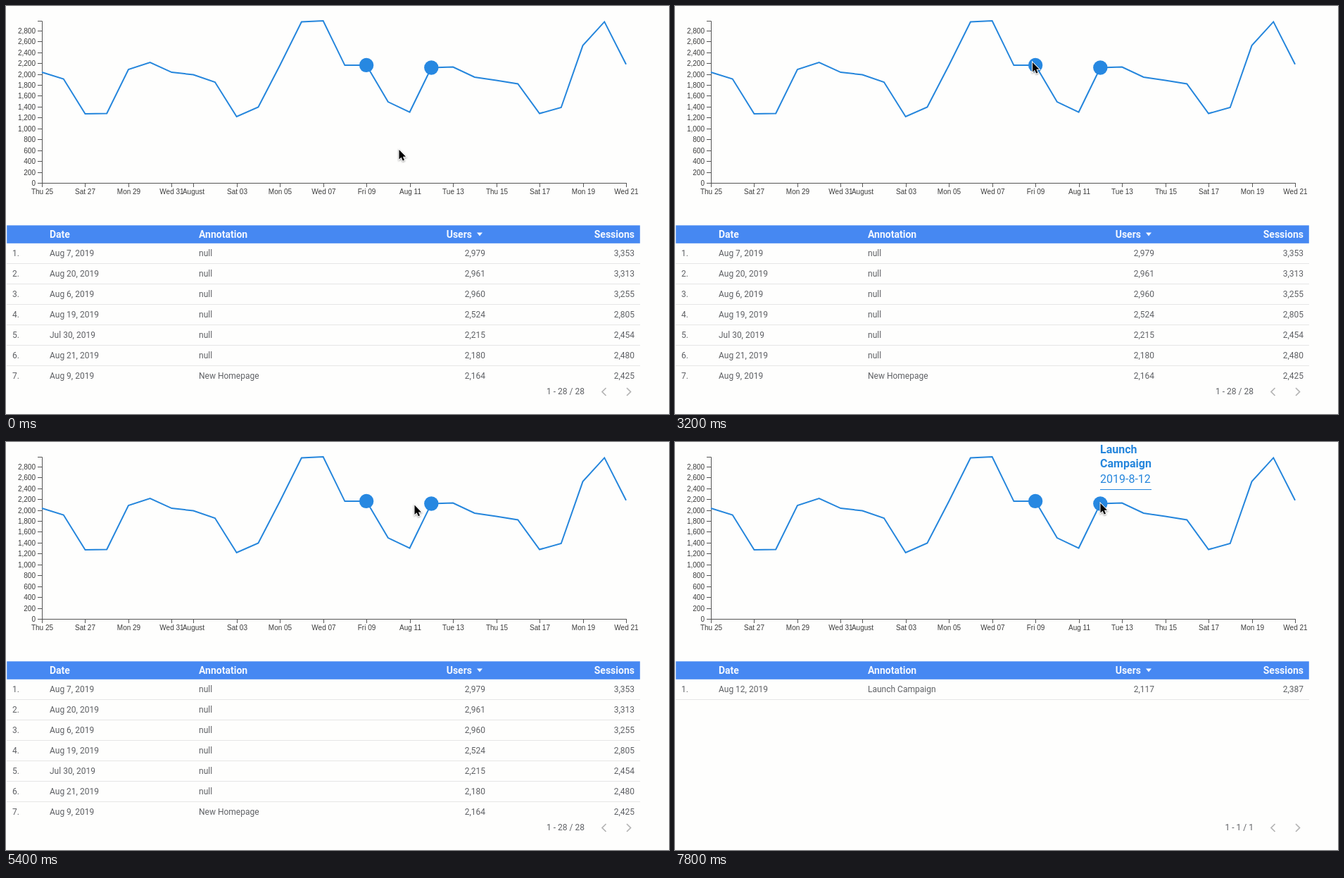
An HTML page that plays this animation: 942x579 px, repeating every 8 s.

```html
<!DOCTYPE html>
<html lang="en">
<head>
<meta charset="utf-8">
<title>Annotated chart</title>
<style>
html, body { margin: 0; width: 100%; height: 100%; overflow: hidden; background: #fefefd; }
svg { display: block; width: 942px; height: 579px; }
text { font: 12px Roboto, sans-serif; fill: #5f6165; }
.axis text { font: 10px "Liberation Sans", Helvetica, Arial, sans-serif; fill: #3c3c3c; }
.axis path { fill: none; stroke: #555; }
.head text { font-weight: 700; font-size: 14px; fill: #f4f8ff; }
.tip text { font-size: 16px; fill: #2586dc; }
.tip .bold { font-weight: 700; }
.rule { stroke: #e6e6e6; }
.end { text-anchor: end; }
.mid { text-anchor: middle; }
</style>
</head>
<body>
<svg viewBox="0 0 942 579">
  <g id="axes" class="axis"></g>
  <g id="plot" fill="#2788e1"></g>
  <g id="tip" class="tip">
    <text class="bold" x="604" y="16">Launch</text>
    <text class="bold" x="604" y="36">Campaign</text>
    <text x="604" y="58">2019-8-12</text>
    <path d="M604 67.5H677" stroke="#2586dc"/>
  </g>
  <g class="head">
    <rect x="1.2" y="311.3" width="899.6" height="25.5" fill="#4688f2"/>
    <text x="62" y="329">Date</text>
    <text x="274" y="329">Annotation</text>
    <text class="end" x="662" y="329">Users</text>
    <text class="end" x="893" y="329">Sessions</text>
    <path d="M669 321.5H677L673 326.5Z" fill="#f4f8ff"/>
  </g>
  <g id="allRows"></g>
  <g id="oneRow"></g>
  <path d="M852.5 542L847 547.5L852.5 553M882 542L887.5 547.5L882 553" fill="none" stroke="#b4b4b4" stroke-width="1.7"/>
  <g id="cursor" style="filter:drop-shadow(0 1px 1px rgba(0,0,0,.4))">
    <path transform="scale(.95)" d="M0 0V14.2L3.3 11.2L5.5 16.4L7.9 15.4L5.7 10.3H10Z" stroke="#fff" stroke-width="2" paint-order="stroke"/>
  </g>
</svg>
<script>
const el = id => document.getElementById(id);
const label = (x, y, s, cls = '') => `<text x="${x}" y="${y}" class="${cls}">${s}</text>`;
const comma = n => n.toLocaleString('en-US');

// Daily users from Jul 25, 2019
const users = [2033, 1910, 1269, 1275, 2085, 2215, 2033, 1988, 1852, 1218, 1392, 2160, 2960, 2979,
  2162, 2164, 1489, 1301, 2117, 2131, 1943, 1884, 1820, 1275, 1386, 2524, 2961, 2180];
const notes = { 15: 'New Homepage', 18: 'Launch Campaign' };
const marked = Object.keys(notes).map(Number);
const launch = marked[1];
const lastDay = users.length - 1;
const dateOf = day => new Date(Date.UTC(2019, 6, 25 + day));
const format = (day, options) => dateOf(day).toLocaleDateString('en-US', { timeZone: 'UTC', ...options });

// Chart
const px = day => 51 + day * 830 / lastDay;
const py = value => 251 - value * 230 / Math.max(...users);

function dayName(day) {
  const date = dateOf(day).getUTCDate();
  if (date === 1) return format(day, { month: 'long' });
  const prefix = format(day, dateOf(day).getUTCDay() ? { weekday: 'short' } : { month: 'short' });
  return `${prefix} ${String(date).padStart(2, '0')}`;
}

let axes = '<path d="M45 21.5H51.5V251.5H45M51.5 257V251.5H881.5V257"/>';
for (let v = 0; v <= 2800; v += 200) {
  const y = Math.round(py(v)) + .5;
  axes += `<path d="M45 ${y}H51"/>` + label(42, y + 3.2, comma(v), 'end');
}
users.forEach((_, day) => {
  if (dateOf(day).getUTCDate() % 2 === 0) return;
  const x = Math.round(px(day)) + .5;
  axes += `<path d="M${x} 251V257"/>` + label(x, 267.3, dayName(day), 'mid');
});
el('axes').innerHTML = axes;

const points = users.map((v, day) => `${px(day)},${py(v)}`).join(' ');
el('plot').innerHTML = `<polyline points="${points}" fill="none" stroke="#2586dc" stroke-width="2"/>` +
  marked.map(day => `<circle cx="${px(day)}" cy="${py(users[day])}" r="10.2"/>`).join('');

// Table
const ranked = users.map((_, day) => day).sort((a, b) => users[b] - users[a]).slice(0, 7);

function table(days, sessions, pages) {
  const rows = days.map((day, i) => {
    const y = 355 + 29 * i;
    const date = format(day, { month: 'short', day: 'numeric', year: 'numeric' });
    return label(9, y, `${i + 1}.`) + label(62, y, date) + label(274, y, notes[day] || 'null') +
      label(681, y, comma(users[day]), 'end') + label(893, y, comma(sessions[i]), 'end') +
      (i < 6 ? `<path class="rule" d="M1 ${y + 10.5}H901"/>` : '');
  });
  return rows.join('') + label(822, 551, pages, 'end');
}
el('allRows').innerHTML = table(ranked, [3353, 3313, 3255, 2805, 2454, 2480, 2425], '1 - 28 / 28');
el('oneRow').innerHTML = table([launch], [2387], '1 - 1 / 1');

// Motion
const LOOP = 8000, STEP = 200, HOVER = 5600, FILTERED = 7200;
const rest = { x: 558.5, y: 204 };
const glides = [
  { from: 200, to: 1600, x: 500, y: 88 },
  { from: 2000, to: 2600, x: 508, y: 80 },
  { from: 4200, to: 4600, x: 512, y: 97 },
  { from: 4600, to: 5800, x: 604.5, y: 87 }
];
const ease = k => k * k * (3 - 2 * k);

function cursorAt(t) {
  let { x, y } = rest;
  for (const g of glides) {
    const k = ease(Math.min(1, Math.max(0, (t - g.from) / (g.to - g.from))));
    x += (g.x - x) * k;
    y += (g.y - y) * k;
  }
  return [x, y];
}
const show = (id, on) => el(id).setAttribute('visibility', on ? 'visible' : 'hidden');

const start = performance.now();
function draw() {
  const elapsed = (performance.now() - start) % LOOP;
  const t = Math.floor(elapsed / STEP) * STEP;
  el('cursor').setAttribute('transform', `translate(${cursorAt(t)})`);
  show('tip', t >= HOVER);
  show('allRows', t < FILTERED);
  show('oneRow', t >= FILTERED);
  requestAnimationFrame(draw);
}
draw();
</script>
</body>
</html>
```
